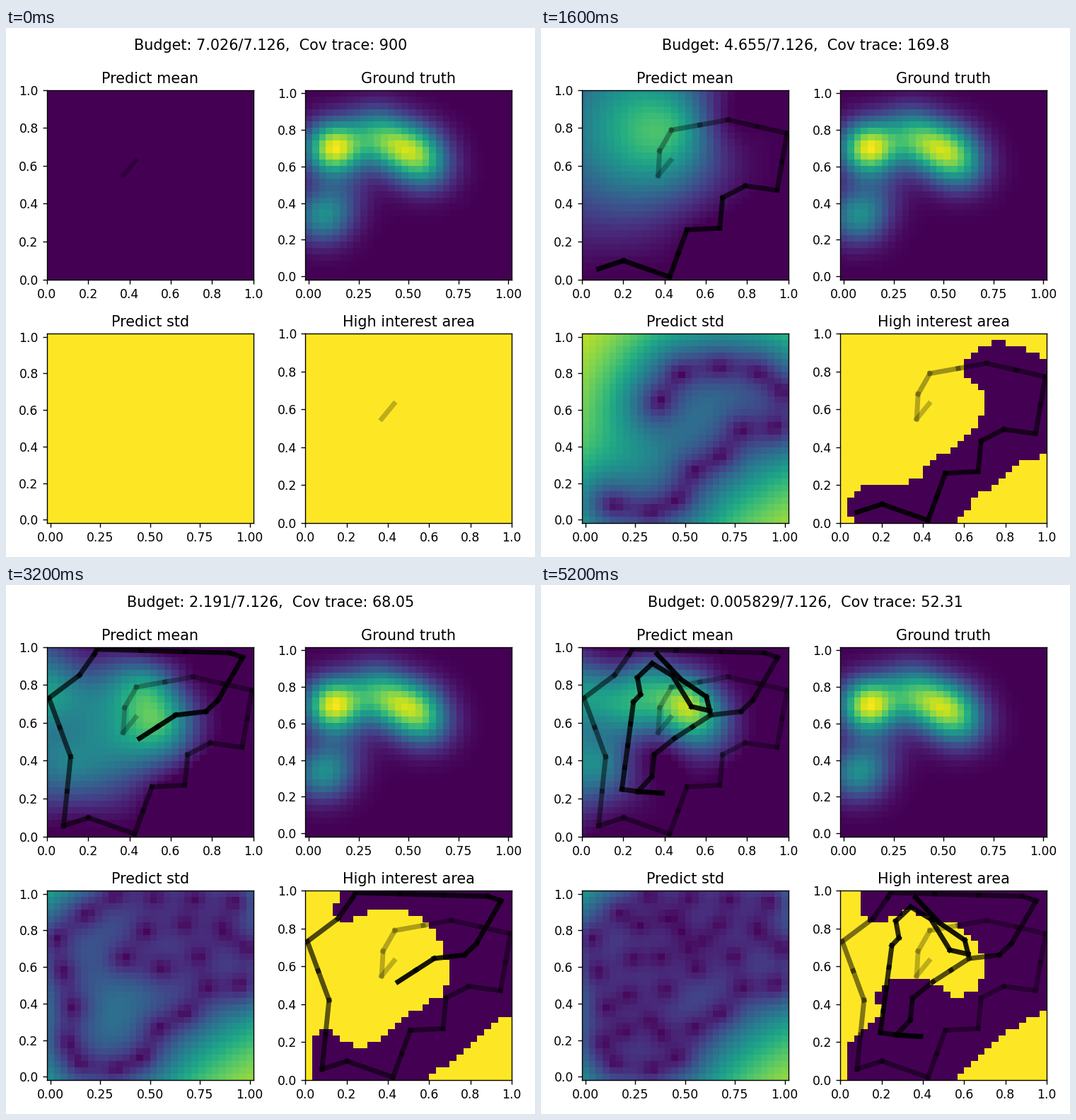
Write a matplotlib script that moves like this. It is 748 by 748 pixels and loops after 5300 ms.

```python
import numpy as np
import matplotlib.pyplot as plt
from matplotlib.animation import FuncAnimation

SIZE = 748
GRID = 30
STEP = 0.2      # distance travelled between two measurements
SCALE = 0.45    # kernel length scale
LEVEL = 0.4     # interest threshold on mean + std
BUDGET = 7.126
LEFTOVER = 0.005829

# Corners of the route: x, y and, on straight runs, the number of equal hops
START = (.430, .629)
TURNS = [
    (.370, .549), (.377, .680), (.434, .789), (.709, .843, 2),
    (.994, .772, 2), (.946, .471, 2), (.792, .494), (.682, .432),
    (.668, .271), (.509, .262), (.425, .013, 2), (.202, .099),
    (.081, .056), (.115, .421, 2), (.010, .731, 2), (.158, .852),
    (.230, .963), (.243, .989), (.884, .970, 3), (.949, .946),
    (.829, .720), (.771, .660), (.624, .641), (.449, .518, 2),
    (.350, .432), (.339, .316), (.271, .237), (.389, .229),
    (.271, .237), (.194, .249), (.250, .710, 4), (.284, .750),
    (.269, .839), (.341, .914), (.439, .849), (.531, .686),
    (.620, .664), (.603, .738), (.480, .830), (.364, .964, 2),
]

# Field bumps: x, y, height
BUMPS = [(.126, .70, .95), (.33, .80, .37), (.42, .705, .42), (.53, .70, .42),
         (.585, .60, .40), (.07, .325, .46), (.165, .455, .13)]


def walk():
    stops = [START]
    for x, y, *hops in TURNS:
        count = hops[0] if hops else 1
        stops += list(np.linspace(stops[-1], (x, y), count + 1)[1:])
    return np.array(stops)


def field(points):
    total = np.zeros(len(points))
    for x, y, height in BUMPS:
        d2 = (points[:, 0] - x) ** 2 + (points[:, 1] - y) ** 2
        total += height * np.exp(-d2 / 0.02)
    return total


def matern(a, b):
    r = np.linalg.norm(a[:, None] - b[None], axis=2) * np.sqrt(3) / SCALE
    return (1 + r) * np.exp(-r)


def predict(samples, points):
    """Gaussian process mean and deviation at the points."""
    if not len(samples):
        return np.zeros(len(points)), np.ones(len(points))
    cross = matern(points, samples)
    cov = matern(samples, samples) + 1e-8 * np.eye(len(samples))
    weights = np.linalg.solve(cov, cross.T)
    mean = weights.T @ field(samples)
    var = 1 - np.sum(cross.T * weights, axis=0)
    return mean, np.sqrt(np.clip(var, 0, None))


route = walk()
frames = len(route) - 1

# Distance along the route, and the measurements taken on the way
travel = np.r_[0, np.cumsum(np.hypot(*np.diff(route, axis=0).T))]
travel *= (BUDGET - LEFTOVER) / travel[-1]
marks = np.arange(STEP, travel[-1], STEP)
samples = np.column_stack([np.interp(marks, travel, c) for c in route.T])
counts = np.searchsorted(marks, travel[1:])

axis = np.linspace(0, 1, GRID)
points = np.stack(np.meshgrid(axis, axis), axis=-1).reshape(-1, 2)
beliefs = [predict(samples[:n], points) for n in counts]

fig = plt.figure(figsize=(6, 6), dpi=SIZE / 6, facecolor="white")
title = fig.suptitle("")


def heatmap(name, left, top, padded=False, edges=axis):
    width, height = 291.8, 267.6
    ax = fig.add_axes((left / SIZE, 1 - (top + height) / SIZE,
                       width / SIZE, height / SIZE))
    mesh = ax.pcolormesh(edges, edges, np.zeros((GRID, GRID)), shading="auto",
                         cmap="viridis", vmin=0, vmax=1)
    pad = 0.5 / (GRID - 1) if padded else 0
    ax.set(title=name, xlim=(-pad, 1 + pad), ylim=(-pad, 1 + pad),
           xticks=np.linspace(0, 1, 5 if padded else 6),
           yticks=np.linspace(0, 1, 6))
    return ax, mesh


mean_ax, mean_map = heatmap("Predict mean", 57.8, 87.9)
_, truth_map = heatmap("Ground truth", 423.2, 87.9, padded=True)
_, std_map = heatmap("Predict std", 57.8, 432.1, padded=True)
area_ax, area_map = heatmap("High interest area", 423.2, 432.1,
                            edges=np.linspace(0, 1, GRID + 1))
truth_map.set_array(field(points).reshape(GRID, GRID))

trails = [[ax.plot(*route[i:i + 2].T, c="black", lw=4, zorder=2)[0]
           for i in range(frames)] for ax in (mean_ax, area_ax)]


def update(n):
    mean, std = beliefs[n]
    area = (mean + std >= LEVEL).astype(float)
    for mesh, values in ((mean_map, mean), (std_map, std), (area_map, area)):
        mesh.set_array(values.reshape(GRID, GRID))
    for trail in trails:
        for i, line in enumerate(trail):
            line.set_visible(i <= n)
            line.set_alpha(0.25 + 0.7 * min(i, n) / (n + 1))
    left = BUDGET - travel[n + 1]
    trace = np.sum(std ** 2)
    title.set_text(f"Budget: {left:.4g}/{BUDGET},  Cov trace: {trace:.4g}")
    return []


anim = FuncAnimation(fig, update, frames=frames, interval=100, repeat=True)
plt.show()
```
